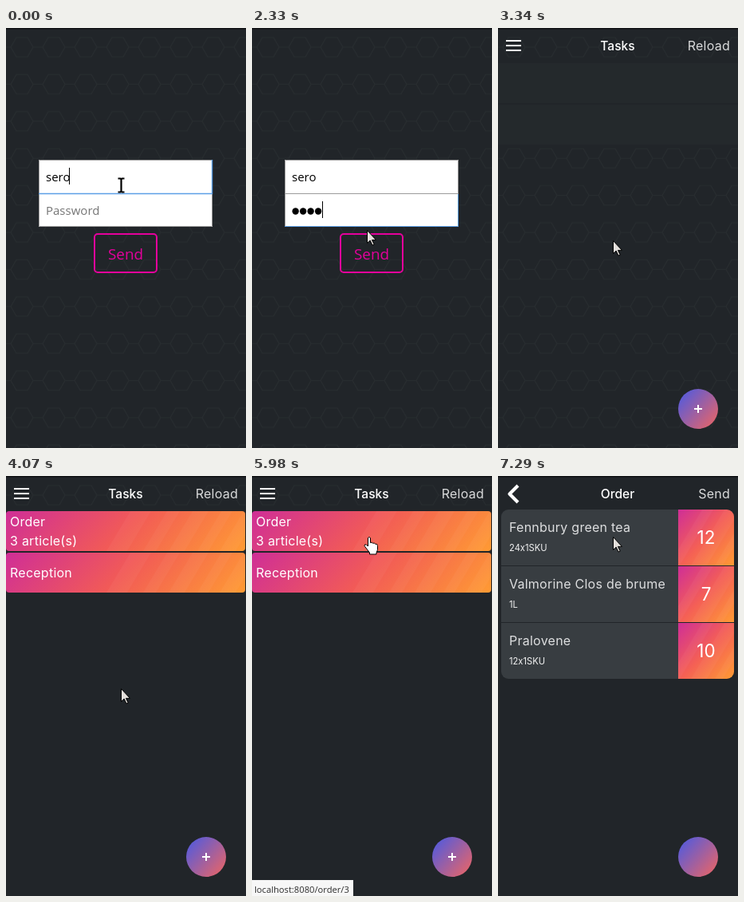
These frames come from a looping animation (301x526 px, 8000 ms). An HTML page:

```html
<!DOCTYPE html>
<html lang="en">
<head>
<meta charset="utf-8">
<title>Task app</title>
<style>
  html, body { margin: 0; width: 100%; height: 100%; overflow: hidden; background: #212529; }
  svg { display: block; width: 100vw; height: 100vh; }
  .form { font-family: "Open Sans", "Noto Sans", sans-serif; }
  .app { font-family: Inter, Roboto, sans-serif; font-size: 16px; letter-spacing: .25px; fill: #fff; }
  .title { text-anchor: middle; letter-spacing: 0; font-size: 15.6px; font-weight: 500; }
  .action { text-anchor: end; fill: #d9dadb; }
  .name { fill: #dedfe0; }
  .unit { font-size: 11.2px; letter-spacing: 0; fill: #f2f2f2; }
  .count { font-size: 22.5px; text-anchor: middle; letter-spacing: 0; }
</style>
</head>
<body>
<svg viewBox="0 0 301 526" preserveAspectRatio="none">
  <defs>
    <linearGradient id="cardFill" gradientUnits="userSpaceOnUse" x1="62.5" y1="-62.5" x2="237.5" y2="112.5">
      <stop offset="0" stop-color="#cf2e97"/>
      <stop offset=".5" stop-color="#f25b56"/>
      <stop offset="1" stop-color="#ff9b33"/>
    </linearGradient>
    <linearGradient id="tileFill" x1="0" y1="0" x2="1" y2="1">
      <stop offset="0" stop-color="#cf2e97"/>
      <stop offset=".5" stop-color="#f45f56"/>
      <stop offset="1" stop-color="#ff9b33"/>
    </linearGradient>
    <linearGradient id="fabFill" x1=".1" y1=".15" x2=".9" y2=".85">
      <stop offset="0" stop-color="#5b5bd6"/>
      <stop offset="1" stop-color="#dd6470"/>
    </linearGradient>
    <pattern id="hex" width="40" height="46.4" patternUnits="userSpaceOnUse" patternTransform="translate(0 .8)">
      <path d="M6 23.2l7-12h14l7 12l-7 12h-14zM0 23.2h6M34 23.2h6" fill="none" stroke="#282d30"/>
    </pattern>
    <clipPath id="cardClip"><rect width="300" height="50" rx="4"/></clipPath>
    <clipPath id="tileClip"><rect width="70" height="70"/></clipPath>
    <clipPath id="listClip"><rect x="4" y="42" width="292" height="212" rx="9"/></clipPath>
  </defs>

  <rect width="301" height="526" fill="#212529"/>
  <rect id="hexBody" y="43" width="301" height="483" fill="url(#hex)"/>
  <rect id="hexHead" width="301" height="43" fill="url(#hex)"/>
  <rect width="301" height="1.5" fill="#101214"/>

  <g id="login" class="form">
    <rect x="41" y="165" width="218" height="84" fill="#fff"/>
    <path d="M41.5 165.5h217v83h-217zM41 207.5h218" fill="none" stroke="#9b9b9b"/>
    <path id="userFocus" d="M258.5 165v42.5H41" fill="none" stroke="#5c9fe6" stroke-width="1.4"/>
    <path id="passFocus" d="M258.5 208v40.5H41" fill="none" stroke="#5c9fe6"/>
    <text x="50" y="192" font-size="15">sero</text>
    <text id="hint" x="50" y="234" font-size="15" fill="#757575">Password</text>
    <g id="dots"></g>
    <rect id="caret" width="1" height="21"/>
    <rect x="111" y="258" width="78" height="48" rx="4" fill="none" stroke="#e5009c" stroke-width="2"/>
    <text x="150" y="290" font-size="18.9" text-anchor="middle" fill="#e5009c">Send</text>
  </g>

  <g id="tasks" class="app">
    <text class="title" x="150" y="28">Tasks</text>
    <text class="action" x="291" y="28">Reload</text>
    <path id="menu" d="M10 16h19M10 22h19M10 28h19" stroke="#fff" stroke-width="2"/>
    <path id="ghost" d="M0 44h301v50H0zM0 96h301v50H0z" fill="#24292c"/>
    <g id="cards"></g>
    <path id="outline" d="M0 43.5h300M0 94.5h300M.5 44v50M299.5 44v50" stroke="#1767a5" stroke-dasharray="1 1"/>
  </g>

  <g id="order" class="app">
    <path d="M25 12L14.5 22.5L25 33" fill="none" stroke="#fff" stroke-width="4.2" stroke-linejoin="round"/>
    <text class="title" x="150" y="28">Order</text>
    <text class="action" x="291" y="28">Send</text>
    <g id="list" clip-path="url(#listClip)"></g>
  </g>

  <circle id="fab" cx="251" cy="477" r="25" fill="url(#fabFill)"/>
  <path id="plus" d="M246 477h10M251 472v10" stroke="#fff" stroke-width="2"/>

  <g id="status" class="form">
    <rect y="506" width="127" height="20" fill="#f7f7f7"/>
    <text x="3" y="522" font-size="11.2" fill="#2c2c2c">localhost:8080/order/3</text>
  </g>

  <path id="beam" d="M-4 -8.5h3l1 1l1 -1h3M0 -8v16M-4 8.5h3l1 -1l1 1h3" fill="none" stroke="#000" stroke-width="2.2"/>
  <path id="arrow" d="M.5 .5v16l3.7 -3.4l2.8 6l2.2 -1l-2.7 -5.7h5z" stroke="#000"/>
  <path id="hand" d="M.5 1.5q1.500 -2 3 0v6q2 -1 3 .7q2 -.7 3 .9q3 -.5 3 2.400v5l-1.500 3.500v2h-8.500v-2l-6.500 -8.500q0 -2.500 2.500 -1.500l2 2z" fill="#fff" stroke="#000"/>
</svg>
<script>
const LOOP = 8000;
const $ = id => document.getElementById(id);
const show = (id, on) => $(id).setAttribute("visibility", on ? "inherit" : "hidden");
const place = (id, x, y) => $(id).setAttribute("transform", `translate(${x} ${y})`);
const between = (t, a, b) => t >= a && t < b;

// Slanted light bands inside a gradient panel
const bands = (xs, h, rise) => xs.map(([x, w]) =>
  `<path d="M${x} ${h}l${rise} ${-h}h${w}l${-rise} ${h}z" fill="#fff" opacity=".035"/>`).join("");

const card = (y, lines) => `<g transform="translate(0 ${y})"><g clip-path="url(#cardClip)">
  <rect width="300" height="50" fill="url(#cardFill)"/>
  ${bands([[126, 26], [172, 16], [204, 20], [240, 14], [268, 20]], 50, 30)}</g>
  ${lines.map(([text, dy]) => `<text x="5" y="${dy}">${text}</text>`).join("")}</g>`;

const row = ([name, unit, count], i) => `<g transform="translate(0 ${42 + 71 * i})">
  <rect x="4" width="222" height="70" fill="#383d41"/>
  <g transform="translate(226 0)"><g clip-path="url(#tileClip)">
    <rect width="70" height="70" fill="url(#tileFill)"/>${bands([[-12, 14], [16, 20], [46, 10]], 70, 42)}</g>
    <text class="count" x="35" y="43">${count}</text></g>
  <text class="name" x="14" y="28">${name}</text>
  <text class="unit" x="14" y="52">${unit}</text></g>`;

$("cards").innerHTML =
  card(44, [["Order", 19], ["3 article(s)", 43]]) + card(96, [["Reception", 31]]);
$("list").innerHTML = [
  ["Fennbury green tea", "24x1SKU", 12],
  ["Valmorine Clos de brume", "1L", 7],
  ["Pralovene", "12x1SKU", 10]
].map(row).join("");
$("dots").innerHTML = [0, 1, 2, 3].map(i =>
  `<circle cx="${54.6 + 9.5 * i}" cy="229.5" r="4.2"/>`).join("");

const KEYS = [620, 770, 920, 1160];

// The pointer jumps through a fixed number of equal time steps
const stepped = (t, start, gap, n) =>
  Math.max(0, Math.min(n, Math.floor((t - start) / gap) + 1)) / n;

function pointer(t) {
  if (t < 5380) {
    const u = stepped(t, 2140, 61.6, 7);
    const y = 197 + 69 * (1 - (1 - u) ** 2);
    return { kind: y < 249 ? "beam" : "arrow", x: 144, y };
  }
  const u = stepped(t, 5380, 66.6, 10);
  const y = 266 - 190 * (1 - (1 - u) ** 1.2);
  return { kind: y < 146 && t < 7100 ? "hand" : "arrow", x: t < 7100 ? 145 : 144, y };
}

function drawLogin(t) {
  const typed = KEYS.filter(k => t >= k).length;
  show("login", t < 3000);
  show("userFocus", t < 310);
  show("passFocus", between(t, 310, 2690));
  show("hint", !typed);
  [...$("dots").children].forEach((dot, i) =>
    dot.setAttribute("visibility", i < typed ? "inherit" : "hidden"));
  show("caret", t < 130 || between(t, 310, 1340) || between(t, 1830, 2390));
  if (t < 310) place("caret", 79, 175);
  else place("caret", Math.round(50 + 9.5 * typed), 217);
}

function drawTasks(t) {
  show("tasks", between(t, 3000, 7160));
  show("menu", t >= 3340);
  show("ghost", between(t, 3060, 4070));
  show("cards", t >= 4070);
  show("outline", t >= 7040);
  show("fab", t >= 3060);
  show("plus", between(t, 3340, 7160));
}

function drawStatus(t) {
  show("status", between(t, 5850, 7290));
  const fade = t < 7100 ? 1 : t < 7160 ? .8 : t < 7220 ? .45 : .15;
  $("status").setAttribute("opacity", fade);
}

function drawPointer(t) {
  const p = pointer(t);
  for (const kind of ["beam", "arrow", "hand"]) show(kind, kind === p.kind);
  place(p.kind, p.x + .5 * (p.kind === "beam"), Math.round(p.y));
  $("arrow").setAttribute("fill", between(t, 7100, 7160) ? "#1f8f94" : "#e4e0dc");
}

function draw(t) {
  show("hexBody", t < 4070);
  show("hexHead", t < 7160);
  drawLogin(t);
  drawTasks(t);
  show("order", t >= 7160);
  drawStatus(t);
  drawPointer(t);
}

const start = performance.now();
function tick() {
  draw((performance.now() - start) % LOOP);
  requestAnimationFrame(tick);
}
tick();
</script>
</body>
</html>
```
